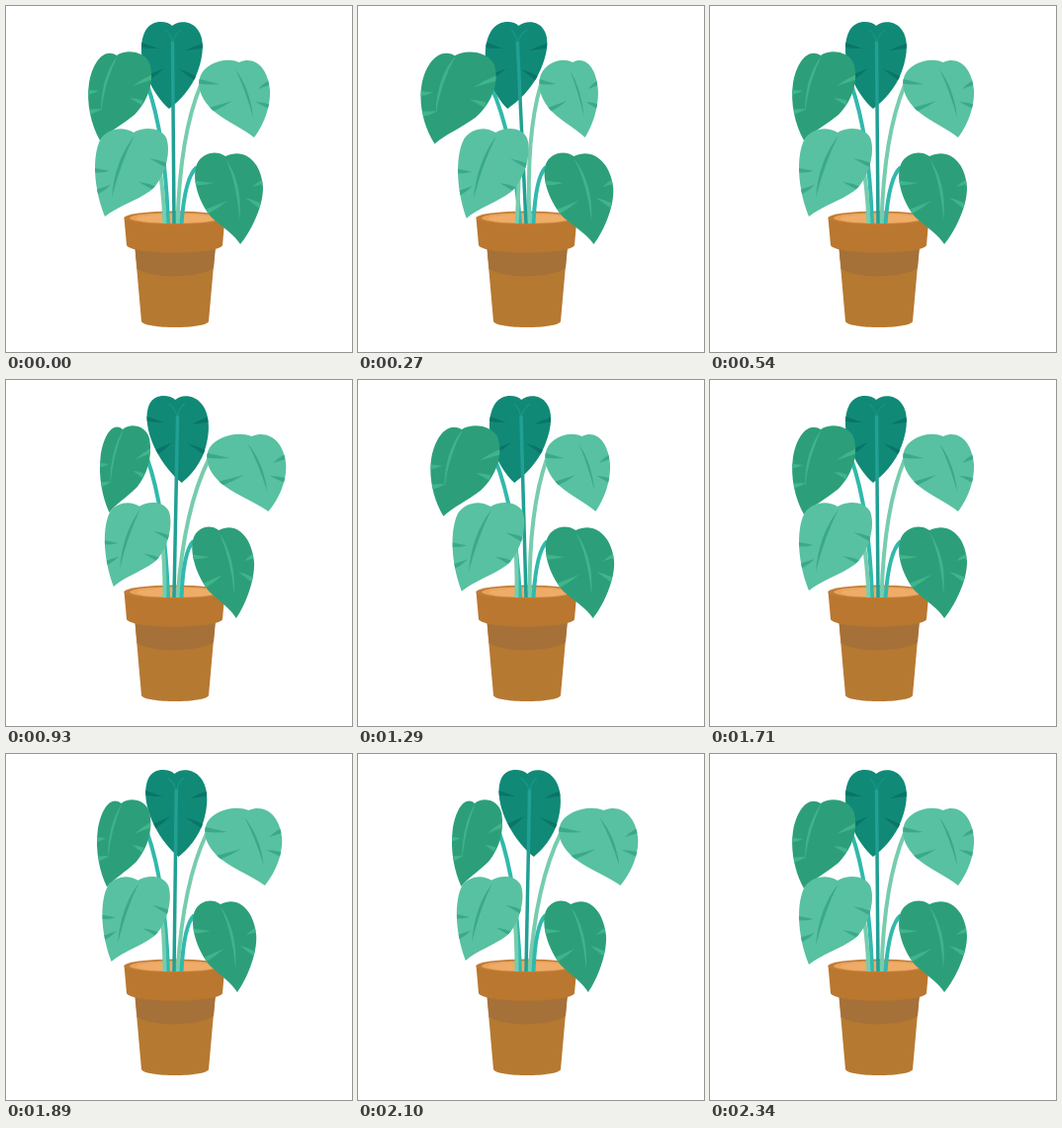
An HTML page for the animation above (3 s loop, 350x350 px).

```html
<!DOCTYPE html>
<html lang="en">
<head>
<meta charset="utf-8">
<title>Swaying plant</title>
<style>
html, body { margin: 0; width: 100%; height: 100%; overflow: hidden; background: #fff; }
svg { display: block; width: 100vw; height: 100vh; }
</style>
</head>
<body>
<svg viewBox="0 0 350 350">
  <g>
    <path fill="#b67931" d="M130 240L137 319C140 327 202 327 205 319L212 240Z"/>
    <path fill="#a57138" d="M130.500 244L132.500 266C148 276 194 276 210 265L212 244Z"/>
    <path fill="#b9772f" d="M119.500 214L122 242C126 252 215 252 219 242L221.500 214Z"/>
    <ellipse cx="170.500" cy="214.500" rx="51" ry="7" fill="#c17b35"/>
    <ellipse cx="171" cy="214.500" rx="46" ry="5.500" fill="#e8a25a"/>
    <ellipse cx="172" cy="215" rx="40" ry="4.500" fill="#efac68"/>
  </g>
  <g id="stems" fill="none" stroke-width="4"></g>
  <g id="leaves"></g>
</svg>
<script>
const LOOP = 3000, CYCLE = 1170, END = 2340, STEP = 30;
// Sway: -1 is fully left, 1 fully right.
const SWAY = [[0, 0], [255, -1], [540, 0], [855, 1], [1170, 0]];
const DARK = '#2c9f7a', LIGHT = '#58c1a1';

// pin: fixed corner; left/right: [shift, scaleX, skew, scaleY] at each extreme
// stem: start x,y, bend x,y, foot x; slits: edge x,y to inner x,y
const leaves = [
  { fill: '#108a77', mark: '#0b7468', line: '#21a094', stemColor: '#21a094', onTop: true,
    shape: 'M168 20C163 15 148 13 141 25C134 38 137 58 143 72C148 85 157 97 165 104C174 97 188 84 194 66C200 50 201 33 194 24C188 15 175 14 168 20Z',
    vein: 'M161 24Q167 29 168.500 38Q170 29 177 24',
    slits: [[136, 39, 154, 43], [143, 73, 160, 63], [200, 40, 182, 45], [193, 74, 175, 64]],
    pin: [168, 45], left: [-8.5, 1, -.1, 1], right: [8, 1, .15, 1],
    stem: [168.5, 36, 169, 130, 170] },
  { fill: DARK, mark: '#40b48b', line: '#40b48b', stemColor: '#31b9ac',
    shape: 'M112 50C100 42 88 55 84 78C81 98 86 120 95 136C104 127 118 120 130 110C143 97 150 78 146 60C142 46 122 43 112 50Z',
    vein: 'M113 50Q96 72 96 108Q100 76 113 50',
    slits: [[82, 87, 94, 86], [85, 107, 97, 104], [148, 72, 128, 81], [138, 98, 125, 93]],
    pin: [147, 46], left: [-8, 1.2, 0, 1.04], right: [-1.3, .737, 0, .97],
    stem: [143, 80, 161, 130, 164] },
  { fill: LIGHT, mark: '#3aa98a', line: '#3aa98a', stemColor: '#77ccae',
    shape: 'M236 57C222 51 204 58 198 68C191 80 198 96 211 107C225 118 240 124 251 133C258 124 268 105 267 85C265 63 252 50 236 57Z',
    vein: 'M232 64Q247 84 250 113Q242 84 232 64',
    slits: [[194, 76, 216, 79], [207, 105, 229, 96], [268, 77, 255, 84], [267, 102, 252, 97]],
    pin: [195, 55], left: [-12.5, .82, 0, 1], right: [10.5, 1.15, 0, 1],
    stem: [197, 80, 176, 130, 173.5] },
  { fill: LIGHT, mark: '#3aa98a', line: '#3aa98a', stemColor: '#77ccae',
    shape: 'M129 128C118 121 103 124 96 134C88 148 87 180 100 213C112 203 132 197 146 187C160 176 168 148 162 133C156 122 139 122 129 128Z',
    vein: 'M130 131Q110 156 107 194Q116 158 130 131',
    slits: [[88, 166, 105, 167], [92, 188, 106, 181], [164, 162, 145, 154], [152, 185, 134, 178]],
    pin: [163.5, 124], left: [9.5, .96, -.02, 1.02], right: [3.3, .87, 0, .94],
    stem: [153, 150, 159, 180, 160.5] },
  { fill: DARK, mark: '#40b48b', line: '#40b48b', stemColor: '#31b9ac',
    shape: 'M222 152C212 145 198 149 193 160C187 176 196 200 208 214C219 224 231 231 237 241C247 229 260 204 260 184C259 160 243 142 222 152Z',
    vein: 'M222 154Q240 180 236 217Q234 180 222 154',
    slits: [[190, 179, 210, 179], [203, 208, 224, 197], [262, 177, 249, 183], [257, 202, 242, 194]],
    pin: [191, 148], left: [-4, 1, .06, 1], right: [-5, .87, .06, 1],
    stem: [193, 163, 181, 173, 177.5] }
];

const $ = id => document.getElementById(id);

function add(parent, tag, attrs) {
  const el = document.createElementNS('http://www.w3.org/2000/svg', tag);
  for (const k in attrs) el.setAttribute(k, attrs[k]);
  return parent.appendChild(el);
}

// Wedge that narrows from the leaf edge to its inner end
function wedge([x, y, ix, iy]) {
  const len = Math.hypot(ix - x, iy - y), nx = (y - iy) / len * 2.5, ny = (ix - x) / len * 2.5;
  return `M${x + nx} ${y + ny}Q${(x + ix) / 2 + nx} ${(y + iy) / 2 + ny} ${ix} ${iy}L${x - nx} ${y - ny}Z`;
}

leaves.forEach((leaf, i) => {
  const g = leaf.group = add($('leaves'), 'g', {});
  add(add(g, 'clipPath', { id: 'clip' + i }), 'path', { d: leaf.shape });
  add(g, 'path', { d: leaf.shape, fill: leaf.fill });
  const marks = add(g, 'g', { 'clip-path': `url(#clip${i})` });
  add(marks, 'path', { d: leaf.slits.map(wedge).join(''), fill: leaf.mark });
  add(marks, 'path', leaf.onTop
    ? { d: leaf.vein, fill: 'none', stroke: leaf.line, 'stroke-width': 1, opacity: .6 }
    : { d: leaf.vein, fill: leaf.line });
  leaf.path = add($(leaf.onTop ? 'leaves' : 'stems'), 'path',
    { stroke: leaf.stemColor, fill: 'none', 'stroke-width': leaf.onTop ? 3.5 : 4 });
});

function swayAt(t) {
  const i = SWAY.findIndex(k => k[0] > t);
  const [t0, a] = SWAY[i - 1], [t1, b] = SWAY[i];
  return a + (b - a) * (t - t0) / (t1 - t0);
}

function pose(leaf, s) {
  const u = Math.abs(s), to = s < 0 ? leaf.left : leaf.right;
  const [dx, sx, k, sy] = [0, 1, 0, 1].map((v, i) => v + (to[i] - v) * u);
  const [px, py] = leaf.pin;
  const e = px + dx - sx * px - k * py, f = py - sy * py;
  leaf.group.setAttribute('transform', `matrix(${sx} 0 ${k} ${sy} ${e} ${f})`);

  const [x, y, bx, by, foot] = leaf.stem;
  const nx = sx * x + k * y + e, ny = sy * y + f;
  leaf.path.setAttribute('d', `M${nx} ${ny}Q${bx + (nx - x) / 2} ${by} ${foot} 220`);
}

const start = performance.now();
function draw() {
  const t = Math.floor(Math.max(0, performance.now() - start) % LOOP / STEP) * STEP;
  const s = t < END ? swayAt(t % CYCLE) : 0;
  leaves.forEach(leaf => pose(leaf, s));
  requestAnimationFrame(draw);
}
draw();
</script>
</body>
</html>
```
